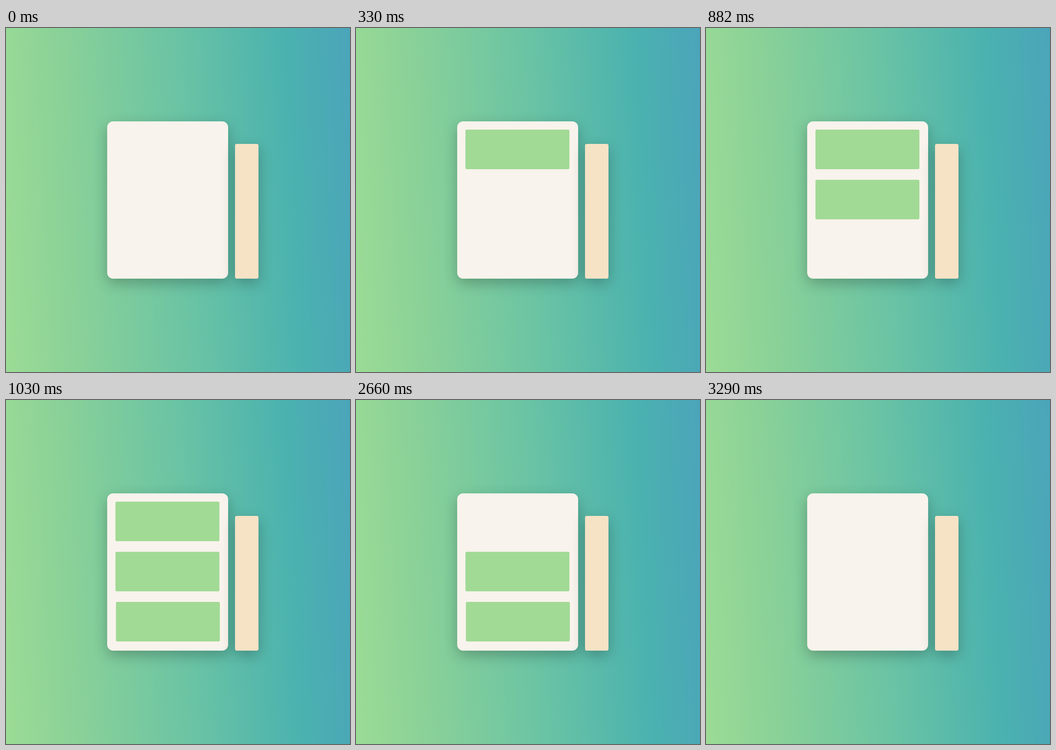
These frames come from a looping animation (748 px wide and 748 px high, 3.32 s). An HTML page:

```html
<!DOCTYPE html>
<html lang="en">
<head>
<meta charset="utf-8">
<title>Stacking blocks</title>
<style>
html, body {
  margin: 0;
  width: 100%;
  height: 100%;
  overflow: hidden;
}
.stage {
  position: relative;
  width: 748px;
  height: 748px;
  overflow: hidden;
  background: linear-gradient(87deg, #9bdb95, #8ad198 20%, #67c2a5 55%, #4bb2af 81.5%, #4ba5ba);
}
.stage div { position: absolute; }
.card, .bar { box-shadow: 0 10px 30px rgba(0, 0, 0, .25); }
.card {
  left: 220px;
  top: 203.3px;
  width: 263px;
  height: 342.2px;
  border-radius: 13px;
  background: #f8f3ec;
}
.bar {
  left: 498px;
  top: 252.2px;
  width: 51px;
  height: 293.3px;
  border-radius: 4px;
  background: #f6e2c5;
}
.block {
  left: 238px;
  width: 225.6px;
  height: 86px;
  border-radius: 3px;
  background: #a1da95;
  visibility: hidden;
  animation: 3320ms step-end infinite;
}
.top { top: 221px; animation-name: top; }
.middle { top: 330.2px; animation-name: middle; }
.bottom { left: 239.3px; top: 439px; animation-name: bottom; }

@keyframes top {
  0%, 80.12% { visibility: hidden; }
  9.939% { visibility: visible; }
}
@keyframes middle {
  0%, 90.06% { visibility: hidden; }
  19.879% { visibility: visible; }
}
@keyframes bottom {
  0%, 99.096% { visibility: hidden; }
  31.024% { visibility: visible; }
}
</style>
</head>
<body>
<div class="stage">
  <div class="card"></div>
  <div class="bar"></div>
  <div class="block top"></div>
  <div class="block middle"></div>
  <div class="block bottom"></div>
</div>
</body>
</html>
```
